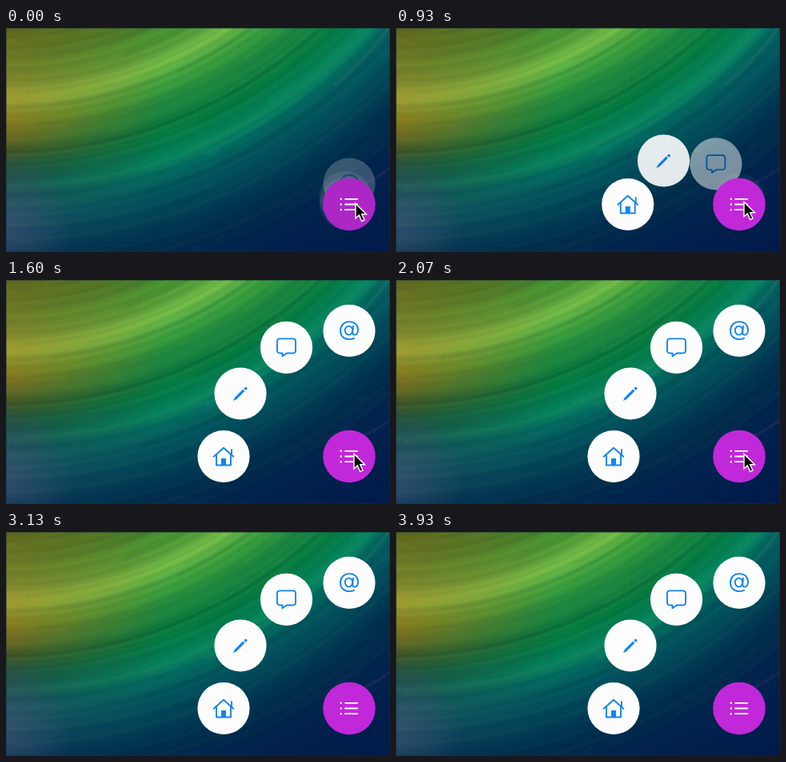
These frames come from a looping animation (480x280 px, 4000 ms). An HTML page with a canvas:

```html
<!DOCTYPE html>
<html lang="en">
<head>
<meta charset="utf-8">
<title>Radial menu</title>
<style>
html, body { margin: 0; width: 100%; height: 100%; overflow: hidden; background: #003050; }
canvas, svg { position: absolute; left: 0; top: 0; width: 480px; height: 280px; display: block; }
.icon { fill: none; stroke: #1285f0; stroke-width: 1.9; stroke-linejoin: round; stroke-linecap: round; }
.disc { fill: #fdfdfd; }
.solid { fill: #1285f0; stroke: none; }
</style>
</head>
<body>
<canvas id="sky" width="480" height="280"></canvas>
<svg viewBox="0 0 480 280">
  <g class="item icon">
    <circle class="disc" r="32.6" stroke="none"/>
    <path d="M-12.3 .3L0-10.7L12.3 .3M-9-2V11H9V-2M10-8.500V-2.500"/>
    <path class="solid" d="M-3 2.500H3V11H-3Z"/>
  </g>
  <g class="item icon">
    <circle class="disc" r="32.6" stroke="none"/>
    <path class="solid" d="M-9 9L-7.200 5L3.200-5.400L5.400-3.200L-5 7.200ZM4.300-6.500L5.800-7.900Q7-8.600 8-7.600T8.200-5.500L6.700-4.200Z"/>
  </g>
  <g class="item icon">
    <circle class="disc" r="32.6" stroke="none"/>
    <path d="M-8-10.900H8Q11.500-10.900 11.500-7.400V3.700Q11.500 7.200 8 7.200H.5L-5 11V7.200H-8Q-11.500 7.200-11.500 3.700V-7.400Q-11.500-10.900-8-10.900Z"/>
  </g>
  <g class="item icon">
    <circle class="disc" r="32.6" stroke="none"/>
    <ellipse cx="-.5" cy="-.3" rx="4.700" ry="5.500"/>
    <path d="M5-5.700L4.200 2.200Q4.200 5.200 6.800 5.200C9.600 5.200 11 2.100 11-1.100C11-7.300 6.500-11.300 .3-11.300C-6.500-11.300-11-6.600-11 0C-11 6.700-6.500 10.700 0 10.700Q3.500 10.700 6 9.400"/>
  </g>
  <g transform="translate(429 220.500)">
    <circle id="menu" r="32.800"/>
    <g stroke="#fff" stroke-width="1.800" stroke-linecap="round">
      <path d="M-5-6.700H10.300M-5 0H10.300M-5 6.700H10.300"/>
      <path stroke-width="2.600" d="M-10.200-6.700h.01M-10.200 0h.01M-10.200 6.700h.01"/>
    </g>
  </g>
  <path id="cursor" d="M0 0V18.500L4.300 14.500L7.700 22L11 20.500L7.700 13.300H13.500Z" fill="#000" stroke="#fff" stroke-width="1.400"/>
</svg>
<script>
const LOOP = 4000, FPS = 15;
const HOME = [429, 220.5];
const ENDS = [[272, 220.5], [293, 142], [350.5, 84.3], [429, 63.4]];
const items = [...document.querySelectorAll('.item')];
const menu = document.getElementById('menu');
const cursor = document.getElementById('cursor');
const clamp = v => Math.max(0, Math.min(1, v));

function paintSky() {
  const cx = 0, cy = -420, near = 410, far = 850;
  const c = document.getElementById('sky').getContext('2d');
  const layer = document.createElement('canvas');
  layer.width = 480; layer.height = 280;
  const l = layer.getContext('2d');

  const fillRings = (ctx, stops) => {
    const g = ctx.createRadialGradient(cx, cy, near, cx, cy, far);
    for (const [r, color] of stops) g.addColorStop((r - near) / (far - near), color);
    ctx.fillStyle = g;
    ctx.fillRect(0, 0, 480, 280);
  };

  fillRings(c, [
    [410, '#567624'], [446, '#3f7c2a'], [468, '#489632'], [490, '#62ae40'],
    [503, '#74be4a'], [524, '#40a43e'], [555, '#1c8840'], [585, '#077c42'],
    [602, '#047e52'], [616, '#058662'], [632, '#077064'], [648, '#055c62'],
    [670, '#024a5c'], [695, '#013852'], [725, '#012a4e'], [765, '#01214e'], [850, '#00194a']
  ]);
  fillRings(l, [
    [410, '#5e661c'], [440, '#6c7020'], [470, '#788028'], [490, '#8e9030'],
    [510, '#a09a30'], [530, '#908220'], [552, '#756c20'], [570, '#505e26'],
    [592, '#26523a'], [620, '#145450'], [650, '#185460'], [680, '#0e405a'], [720, '#02284a'], [850, '#001a40']
  ]);
  const mask = l.createLinearGradient(0, 0, 200, 0);
  mask.addColorStop(0, 'rgba(0,0,0,1)');
  mask.addColorStop(.5, 'rgba(0,0,0,.5)');
  mask.addColorStop(1, 'rgba(0,0,0,0)');
  l.globalCompositeOperation = 'destination-in';
  l.fillStyle = mask;
  l.fillRect(0, 0, 480, 280);
  c.drawImage(layer, 0, 0);

  // slate haze at the lower left
  const haze = c.createRadialGradient(0, 242, 0, 0, 242, 85);
  haze.addColorStop(0, 'rgba(70,85,120,.6)');
  haze.addColorStop(1, 'rgba(70,85,120,0)');
  c.fillStyle = haze;
  c.fillRect(0, 0, 480, 280);

  // soft streaks following the rings
  let seed = 29;
  const rnd = () => (seed = seed * 16807 % 2147483647) / 2147483647;
  c.filter = 'blur(1.3px)';
  for (let i = 0; i < 240; i++) {
    const r = 415 + rnd() * 330, a = .7 + rnd() * .85, span = .4 + rnd() * .8;
    const alpha = .01 + rnd() * .03;
    c.strokeStyle = rnd() < .5 ? `rgba(160,225,140,${alpha})` : `rgba(0,25,45,${alpha * 1.5})`;
    c.lineWidth = 1 + rnd() * 5;
    c.beginPath();
    c.arc(cx, cy, r, a - span / 2, a + span / 2);
    c.stroke();
  }
  const streak = (x0, y0, qx, qy, x1, y1, w, color) => {
    c.strokeStyle = color;
    c.lineWidth = w;
    c.beginPath();
    c.moveTo(x0, y0);
    c.quadraticCurveTo(qx, qy, x1, y1);
    c.stroke();
  };
  streak(250, 158, 380, 92, 462, -4, 8, 'rgba(20,150,115,.2)');
  streak(410, 72, 450, 40, 478, 0, 3, 'rgba(100,120,130,.25)');
  streak(448, 194, 465, 186, 482, 174, 2.5, 'rgba(80,60,120,.4)');
  c.filter = 'none';
  c.strokeStyle = 'rgba(20,50,60,.45)';
  c.lineWidth = 1;
  c.strokeRect(.5, .5, 479, 279);
}

// underdamped spring, 0 to 1
function spring(ms) {
  if (ms <= 0) return 0;
  const k = 1.53, q = ms / 1000 * 8.33;
  return 1 - Math.exp(-k * q) * (Math.cos(q) + k * Math.sin(q));
}

function spread(i, t) {
  if (t < 400) return [.03, .03, .065, .162][i] * clamp(1 - t / 130) ** 2;
  return spring(t - 734 - i * 60);
}

function mix(a, b, k) {
  return `rgb(${a.map((v, i) => Math.round(v + (b[i] - v) * k))})`;
}

function draw(t) {
  items.forEach((el, i) => {
    const p = spread(i, t);
    const [x, y] = HOME.map((v, n) => v + (ENDS[i][n] - v) * p);
    el.setAttribute('transform', `translate(${x} ${y})`);
    el.setAttribute('opacity', clamp(p * 1.3));
  });
  const press = t < 400 ? clamp(1 - t / 200) : t < 670 ? 0 : clamp(1 - Math.abs(t - 740) / 140);
  menu.setAttribute('fill', mix([193, 40, 217], [172, 39, 198], press));
  const k = clamp(t / 250);
  cursor.setAttribute('transform', `translate(${437 - 2 * k} ${219.5 - 2 * k})`);
  cursor.setAttribute('visibility', t < 2860 ? 'visible' : 'hidden');
}

paintSky();
const start = performance.now();
function tick() {
  const t = (performance.now() - start) % LOOP;
  draw(Math.floor(t * FPS / 1000 + .06) * 1000 / FPS % LOOP);
  requestAnimationFrame(tick);
}
tick();
</script>
</body>
</html>
```
